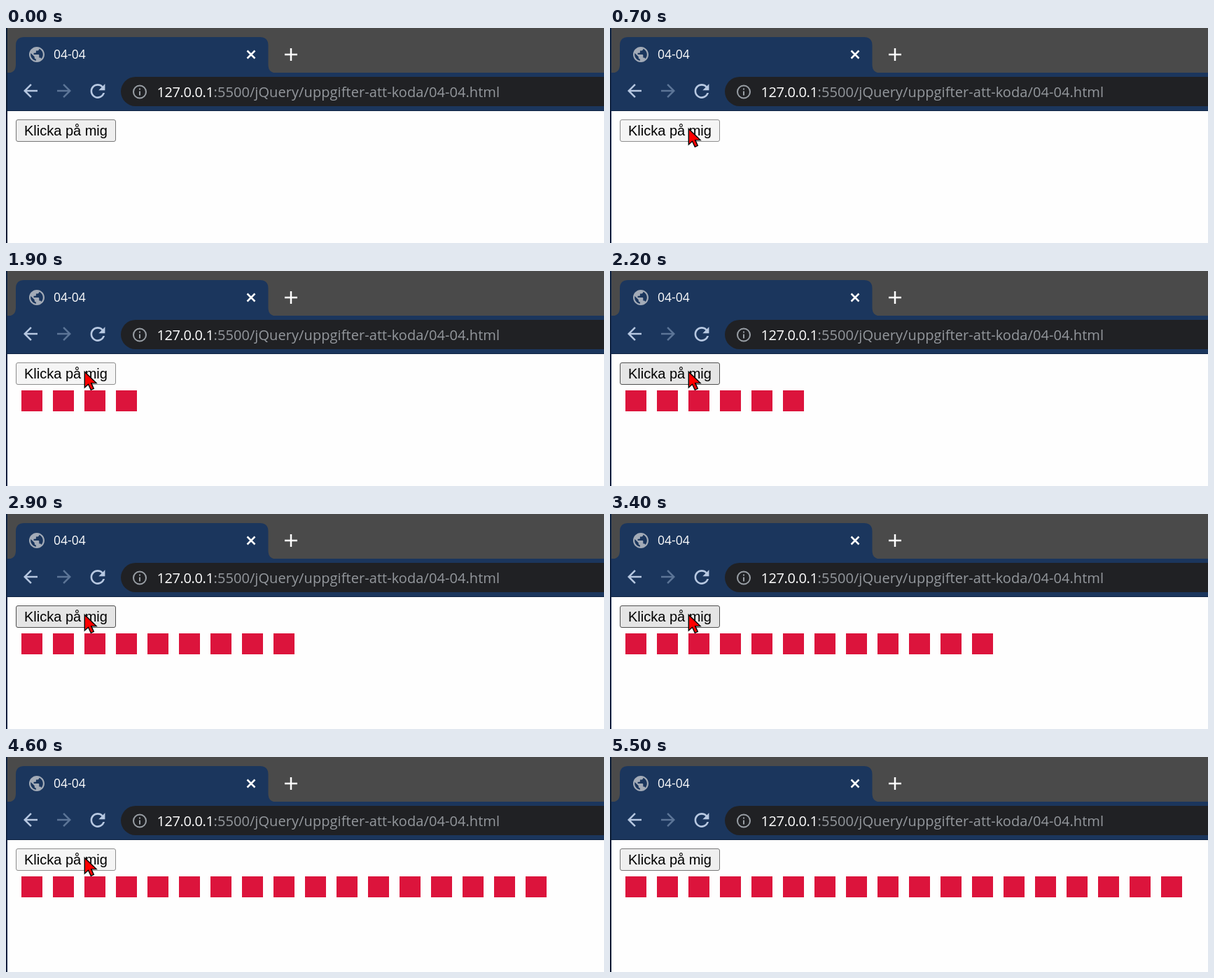
An HTML page for the animation above (5.6 s loop, 854x308 px).

```html
<!DOCTYPE html>
<html lang="sv">
<head>
<meta charset="utf-8">
<title>04-04</title>
<style>
  html, body { margin: 0; width: 100%; height: 100%; overflow: hidden; background: #fefefe; }
  svg { display: block; width: 854px; height: 308px; }
  .ui { font-family: "Open Sans", "Noto Sans", sans-serif; }
  .btn { font: 20px "Liberation Sans", Arial, sans-serif; }
  .line { fill: none; stroke: #fff; stroke-width: 2.5; }
</style>
</head>
<body>
<svg viewBox="0 0 854 308">
  <defs>
    <path id="arrow" d="M20 11H7.83l5.59-5.59L12 4l-8 8 8 8 1.41-1.41L7.83 13H20v-2z"/>
  </defs>

  <!-- Tab strip -->
  <rect width="854" height="65" fill="#4a4a4a"/>
  <path d="M2 64.5Q14 64.5 14 52.500V25Q14 13 26 13H362.500Q374.500 13 374.500 25V52.500Q374.500 64.500 386.500 64.500Z" fill="#1b365d"/>
  <path transform="translate(30.8 24.8) scale(1.1)" fill="#a3abb7" d="M12 2C6.480 2 2 6.480 2 12s4.480 10 10 10 10-4.480 10-10S17.520 2 12 2zm-1 17.930c-3.950-.490-7-3.850-7-7.930 0-.620.080-1.210.210-1.790L9 15v1c0 1.100.900 2 2 2v1.930zm6.900-2.540c-.260-.810-1-1.390-1.900-1.390h-1v-3c0-.550-.450-1-1-1H8v-2h2c.550 0 1-.450 1-1V7h2c1.100 0 2-.900 2-2v-.410c2.930 1.190 5 4.060 5 7.410 0 2.080-.800 3.970-2.100 5.390z"/>
  <text class="ui" x="68" y="44" font-size="17.5" fill="#fff">04-04</text>
  <path class="line" d="M344.500 32.500l11 11m0-11l-11 11M398 38h18m-9-9v18"/>

  <!-- Toolbar -->
  <rect y="64" width="854" height="55" fill="#1b365d"/>
  <rect y="118" width="854" height="1" fill="#0e2342"/>
  <use href="#arrow" transform="translate(20 75) scale(1.25)" fill="#b7c8e1"/>
  <use href="#arrow" transform="translate(98 75) scale(-1.25 1.25)" fill="#5c7597"/>
  <path transform="translate(115.4 74.9) scale(1.3)" fill="#b7c8e1" d="M17.650 6.350C16.200 4.900 14.210 4 12 4c-4.420 0-7.990 3.580-7.990 8s3.570 8 7.990 8c3.730 0 6.840-2.550 7.730-6h-2.080c-.820 2.330-3.040 4-5.650 4-3.310 0-6-2.690-6-6s2.690-6 6-6c1.660 0 3.140.690 4.220 1.780L13 11h7V4l-2.350 2.350z"/>
  <rect x="164" y="70" width="740" height="42" rx="21" fill="#202124"/>
  <circle cx="191" cy="91.500" r="9" fill="none" stroke="#9aa0a6" stroke-width="2"/>
  <path d="M191 90.500v6M191 86.500v2" stroke="#9aa0a6" stroke-width="2"/>
  <g class="ui" font-size="20">
    <text x="215.500" y="99" fill="#fff" letter-spacing="-.4">127.0.0.1</text>
    <text x="296.500" y="99" fill="#94989d" letter-spacing=".07">:5500/jQuery/uppgifter-att-koda/04-04.html</text>
  </g>

  <!-- Page -->
  <rect y="119" width="854" height="189" fill="#fefefe"/>
  <rect width="2" height="308" fill="#0b1c36"/>
  <rect id="edge" x="1" width="1" height="308"/>
  <rect id="button" x="14.500" y="131.500" width="142" height="31" rx="2.500"/>
  <text class="btn" x="26" y="154">Klicka på mig</text>
  <path id="boxes" fill="#dc143c"/>
  <path id="cursor" d="M.8 1.500V24L6 19.300 9.800 27.300 13.800 25.400 10.200 17.600H17.500Z" fill="#f00" stroke="#000" stroke-width="1.400"/>
</svg>
<script>
  const LOOP = 5600, STEP = 100;
  const clicks = [800, 1100, 1500, 1700, 2000, 2200, 2400, 2700, 2900, 3100,
                  3300, 3400, 3600, 3700, 3900, 4100, 4300, 4700];
  const presses = [700, 1400, 1600, 1900, 2100, 2300, 2600, 3000, 3200, 3500,
                   3800, 4000, 4200, 4600];
  const looks = {
    idle: ['#efefef', '#767676'],
    hover: ['#e5e5e5', '#4f4f4f'],
    active: ['#f5f5f5', '#8d8d8d']
  };
  const enter = [672, 61], rest = [111.500, 143], leave = [840, 28];

  const el = id => document.getElementById(id);
  const [edge, button, boxes, cursor] = ['edge', 'button', 'boxes', 'cursor'].map(el);
  const clamp = v => Math.min(1, Math.max(0, v));
  const mix = (a, b, p) => a.map((v, i) => v + (b[i] - v) * p);

  function pointer(t) {
    if (t < 100 || t >= 5200) return null;
    if (t < 4800) return mix(enter, rest, 1 - (1 - clamp((t - 100) / 500)) ** 2);
    return mix(rest, leave, clamp((t - 4800) / 300) ** 2);
  }

  function buttonLook(t, pos) {
    if (presses.includes(t)) return looks.active;
    const over = pos && pos[0] >= 14 && pos[0] < 157 && pos[1] >= 131 && pos[1] < 163;
    return over ? looks.hover : looks.idle;
  }

  function draw(time) {
    const t = Math.floor(time % LOOP / STEP) * STEP;
    const pos = pointer(t);
    const [fill, stroke] = buttonLook(t, pos);
    button.setAttribute('fill', fill);
    button.setAttribute('stroke', stroke);
    edge.setAttribute('fill', t >= 700 && t < 5500 ? '#10264a' : '#0b1c36');
    boxes.setAttribute('d', clicks.filter(c => c <= t)
      .map((c, i) => `M${22 + 45 * i} 171h30v30h-30z`).join(''));
    cursor.setAttribute('visibility', pos ? 'visible' : 'hidden');
    if (pos) cursor.setAttribute('transform', `translate(${pos})`);
  }

  const start = performance.now();
  function tick() {
    draw(performance.now() - start);
    requestAnimationFrame(tick);
  }
  tick();
</script>
</body>
</html>
```
